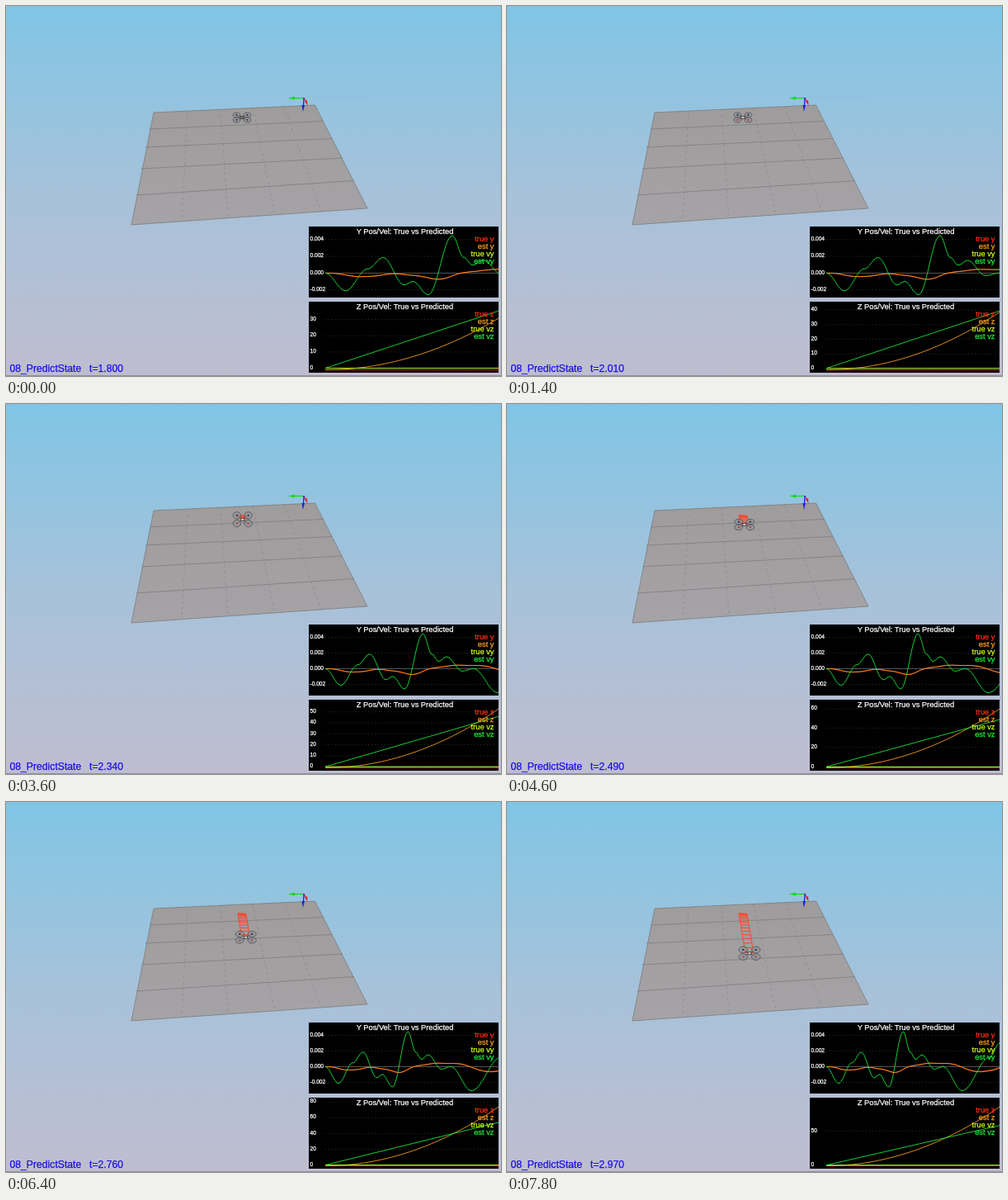
Animation of 600 by 448 pixels, one loop 8 s. Source, as an HTML page:

```html
<!DOCTYPE html>
<html lang="en">
<head>
<meta charset="utf-8">
<title>Predict state</title>
<style>
  html, body { margin: 0; width: 100%; height: 100%; overflow: hidden; background: #c0becf; }
  svg { display: block; width: 600px; height: 448px; font-family: "Liberation Sans", Arial, sans-serif; }
  text { stroke: currentColor; stroke-width: .25; fill: currentColor; }
  .title { font-size: 9.3px; color: #fff; text-anchor: middle; }
  .legend { font-size: 9.3px; text-anchor: end; }
  .tick { font-size: 6.6px; color: #fff; }
  .status { font-size: 12.2px; color: #1c10e4; }
  .line { fill: none; stroke-linejoin: round; stroke-opacity: .85; }
  .grid { stroke: #393939; stroke-width: .8; stroke-dasharray: 1 3; }
</style>
</head>
<body>
<svg viewBox="0 0 600 448">
  <defs>
    <linearGradient id="sky" x2="0" y2="1">
      <stop offset="0" stop-color="#80c5e5"/>
      <stop offset=".5" stop-color="#a6c2da"/>
      <stop offset="1" stop-color="#bfbdd0"/>
    </linearGradient>
    <linearGradient id="floor" x2="0" y2="1">
      <stop offset="0" stop-color="#9f9c9c"/>
      <stop offset="1" stop-color="#a5a3a6"/>
    </linearGradient>
    <clipPath id="plots"><path d="M367 267h230v86h-230zM367 358h230v86h-230z"/></clipPath>
  </defs>
  <rect width="600" height="448" fill="url(#sky)"/>
  <path d="M0 447.500H600" stroke="#8f8f9c"/>
  <path d="M179 129L374.500 120L438 245L152 265Z" fill="url(#floor)" stroke="#7c7b7d" stroke-width=".8"/>
  <g fill="none" stroke="#828184" stroke-width=".9">
    <path d="M174 149L384 139.500M169 171L395 160.500M164 197L408 184M158 229L422 211.500"/>
    <path d="M220 127L213 261M260 125L269 257M299 123.500L326 253M337 122L382 249" stroke-dasharray="3 4" opacity=".65"/>
  </g>
  <path d="M363 109.500H439" stroke="#88c1dc" stroke-width=".7"/>
  <g stroke-width="1.300">
    <path d="M361 111.500H349" stroke="#16dc16"/><path d="M342 111.500L350 109.500V113.500Z" fill="#16dc16"/>
    <path d="M361 111L363.500 116" stroke="#e82020"/><path d="M365.500 120.500L362 115.500L365 114Z" fill="#e82020"/>
    <path d="M361 111L360.500 121" stroke="#2020e0"/><path d="M360 128L358.500 120H362Z" fill="#2020e0"/>
  </g>
  <g id="flight"></g>
  <path d="M367 267h230v86h-230zM367 358h230v86h-230z"/>
  <g id="charts" clip-path="url(#plots)"></g>
  <g id="titles"></g>
  <text class="status" x="4.500" y="443">08_PredictState</text>
  <text class="status" x="101" y="443" id="clock"></text>
</svg>
<script>
const STEP_MS = 200, STEPS = 40, LEFT = 387, RIGHT = 597;
const RED = '#ff2a12', ORANGE = '#ffa01e', YELLOW = '#d2ff1c', GREEN = '#1cf03c';
const $ = id => document.getElementById(id);

// Turning points of the sideways velocity: seconds, mm/s
const TURNS = [
  [0, 0], [.21, -2.1], [.44, .5], [.6, 1.85], [.82, -1.4], [.91, -1], [1.07, -2.57], [1.32, 4.45],
  [1.44, 1.85], [1.53, .95], [1.64, 1.5], [1.85, -.3], [2, 0], [2.33, -3.05], [2.8, 1.2], [2.97, 3]];

function velY(t) {
  const i = Math.max(1, TURNS.findIndex(p => p[0] >= t - 1e-9));
  const [t0, v0] = TURNS[i - 1], [t1, v1] = TURNS[i];
  return v0 + (v1 - v0) * (1 - Math.cos(Math.PI * (t - t0) / (t1 - t0))) / 2;
}

// Position is the running integral of velocity
const DT = .01, path = [0];
for (let t = DT / 2; t < 2.97; t += DT) path.push(path.at(-1) + velY(t) * DT);

function posY(t) {
  const k = Math.min(t / DT, path.length - 1.001), i = Math.floor(k);
  return path[i] + (path[i + 1] - path[i]) * (k - i);
}

const trueY = t => posY(t) + .1 * Math.max(0, t - 2);
const velZ = t => 19.6 * t;
const posZ = t => 9.8 * t * t - 1;

function curve(fn, now, toY, color) {
  const points = [];
  for (let x = LEFT; x <= RIGHT; x++) {
    points.push(x + ',' + toY(fn((x - LEFT) / (RIGHT - LEFT) * now)).toFixed(2));
  }
  return `<polyline class="line" stroke="${color}" points="${points.join(' ')}"/>`;
}

function tickStep(range) {
  const unit = 10 ** Math.floor(Math.log10(range)), lead = range / unit;
  return unit * (lead < 6 ? 1 : lead < 8 ? 2 : 5);
}

function chart(now, curves, low, high, panelTop, format) {
  const bottom = panelTop + 82.5, height = 71.3;
  const toY = v => bottom - (v - low) / (high - low) * height;
  const step = tickStep(high - low);
  let out = '';
  for (let v = Math.ceil(low / step) * step; toY(v) > panelTop + 3; v += step) {
    const y = toY(v);
    out += `<path class="grid" d="M${LEFT} ${y}H${RIGHT}"/><text class="tick" x="368.5" y="${y + 1.2}">${format(v)}</text>`;
  }
  out += `<path d="M${LEFT} ${toY(0)}H${RIGHT}" stroke="#666" stroke-width=".8"/>`;
  return out + curves.map(([color, fn]) => curve(fn, now, toY, color)).join('');
}

function charts(now) {
  let low = 0, high = 0;
  for (let t = 0; t <= now; t += DT) {
    low = Math.min(low, velY(t));
    high = Math.max(high, velY(t));
  }
  return chart(now, [[RED, trueY], [ORANGE, posY], [GREEN, velY]], low, high, 267, v => (v / 1000).toFixed(3)) +
    chart(now, [[RED, () => -1], [ORANGE, posZ], [YELLOW, () => 0], [GREEN, velZ]],
      -1, Math.max(velZ(now), posZ(now)), 358, v => v);
}

// Free fall from rest, with a short pitch towards the viewer
function pose(t) {
  const fall = Math.max(0, t - 2.05), drop = 57 * fall ** 2;
  const pitch = Math.exp(-(((t - 2.26) / .12) ** 2));
  return { x: 286 + drop * .165, y: 135 + drop, dx: 6.5 + 1.4 * fall, dy: 3 + 2.7 * pitch + 1.6 * fall ** 2 };
}

function trail(now) {
  const left = [], right = [];
  for (let t = 2; t <= now + .001; t += .06) {
    const { x, y } = pose(t);
    left.push(`${x - 5} ${y}`);
    right.push(`${x + 5} ${y + .4}`);
  }
  if (!left.length) return '';
  const rungs = left.map((p, i) => `M${p}L${right[i]}`).join('');
  return `<path d="M${left.join('L')}M${right.join('L')}${rungs}" fill="none" stroke="#ff4528"/>`;
}

function drone(now) {
  const { x, y, dx, dy } = pose(now), lit = now > 2;
  let out = `<path d="M${x - dx} ${y - dy}L${x + dx} ${y + dy}M${x + dx} ${y - dy}L${x - dx} ${y + dy}" stroke="#4a4648"/>`;
  for (const sx of [-1, 1]) for (const sy of [-1, 1]) {
    const cx = x + sx * dx, cy = y + sy * dy;
    out += `<ellipse cx="${cx}" cy="${cy}" rx="${dx * .68}" ry="${dy * .7 + .8}" fill="#8e949c" fill-opacity=".65" stroke="#5a595d" stroke-width=".9"/>
      <circle cx="${cx}" cy="${cy}" r="1.1" fill="${lit && sy > 0 ? '#c63b25' : '#303034'}"/>`;
  }
  return out + `<rect x="${x - 2}" y="${y - 1.5}" width="4" height="3" fill="${lit ? '#d8c5bd' : '#77777c'}" stroke="#3b3b40" stroke-width=".8"/>`;
}

function titles(axis, top) {
  const names = [['true ', RED], ['est ', ORANGE], ['true v', YELLOW], ['est v', GREEN]];
  return `<text class="title" x="483.5" y="${top + 9.3}">${axis.toUpperCase()} Pos/Vel: True vs Predicted</text>` +
    names.map(([name, color], i) =>
      `<text class="legend" x="591.5" y="${top + 17.8 + i * 8.9}" color="${color}">${name + axis}</text>`).join('');
}

$('titles').innerHTML = titles('y', 267) + titles('z', 358);

let shown = -1;
function render(ms) {
  const step = Math.floor(ms / STEP_MS) % STEPS;
  if (step !== shown) {
    shown = step;
    const now = 1.8 + step * .03;
    $('flight').innerHTML = trail(now) + drone(now);
    $('charts').innerHTML = charts(now);
    $('clock').textContent = 't=' + now.toFixed(3);
  }
}

const start = performance.now();
function loop() {
  render(performance.now() - start);
  requestAnimationFrame(loop);
}
loop();
</script>
</body>
</html>
```
